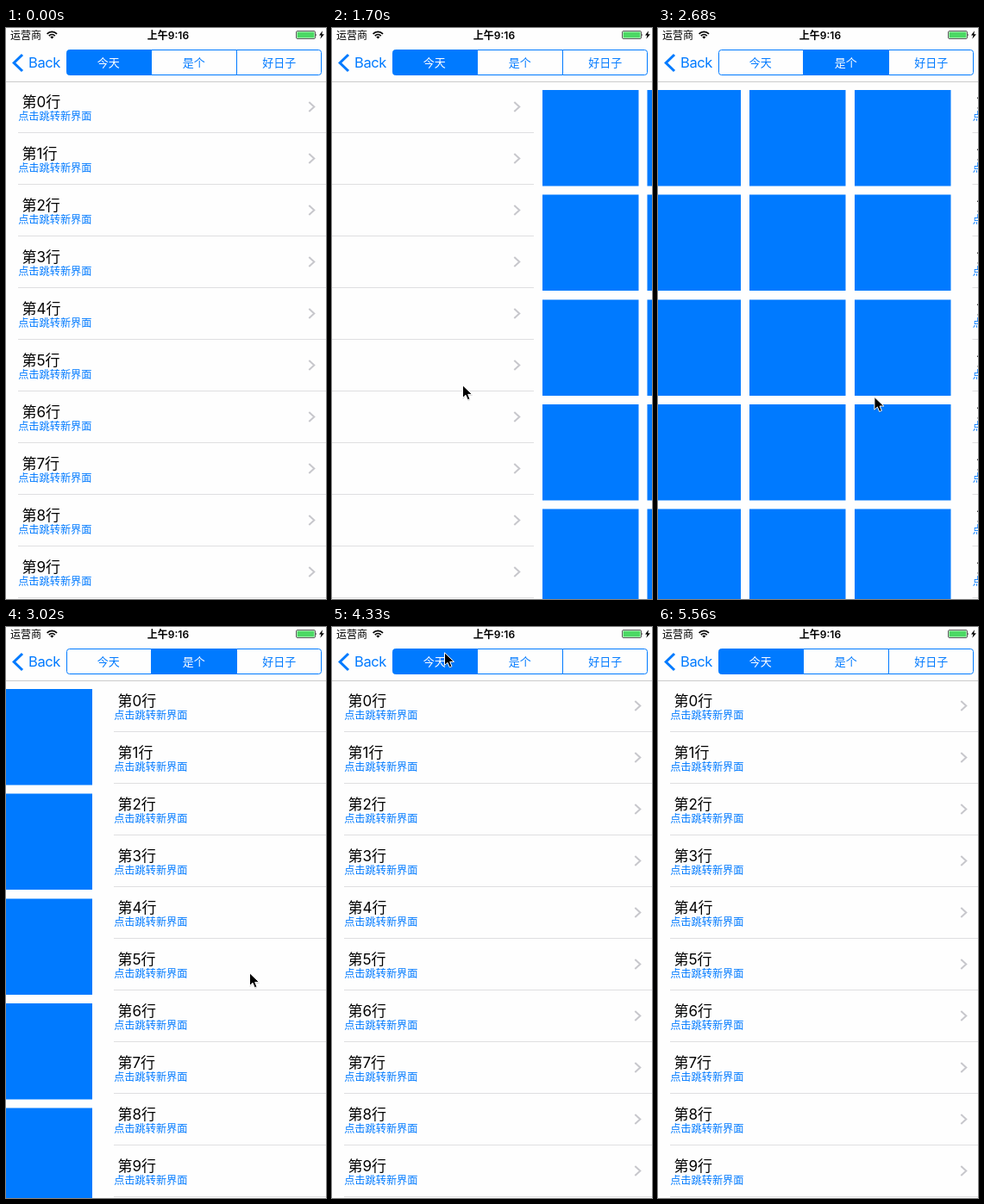
These frames come from a looping animation (371x663 px, 5890 ms). An HTML page:

```html
<!DOCTYPE html>
<html lang="zh-CN">
<head>
<meta charset="utf-8">
<title>Paged lists</title>
<style>
  html, body { margin: 0; width: 100%; height: 100%; overflow: hidden; background: #fefefe; }
  svg { display: block; width: 371px; height: 663px; }
  text { font-family: Inter, "Noto Sans CJK SC", "Noto Sans CJK", sans-serif; }
  .title { font-size: 17px; }
  .sub { font-size: 12.2px; fill: #007aff; }
  .seg { font-size: 13px; text-anchor: middle; }
  .status { font-size: 12px; }
</style>
</head>
<body>
<svg viewBox="0 0 371 663">
  <rect width="371" height="663" fill="#fefefe"/>
  <g id="pages"></g>

  <rect width="371" height="62" fill="#fefefe"/>
  <rect y="62" width="371" height="1" fill="#cbcbcb"/>

  <text class="status" x="5" y="12.5">运营商</text>
  <g fill="none" stroke="#000" stroke-width="1.7">
    <path d="M47.6 6.8a8 8 0 0 1 11.4 0M49.8 9.1a5 5 0 0 1 7 0"/>
    <path d="M51.3 10.4a2.9 2.9 0 0 1 4 0L53.3 12.6z" fill="#000" stroke="none"/>
  </g>
  <text class="status" x="188" y="12.5" text-anchor="middle" font-weight="600">上午9:16</text>
  <rect x="336.5" y="3.5" width="22" height="9" rx="1.5" fill="none" stroke="#333" stroke-width=".8"/>
  <rect x="337.5" y="4.5" width="20" height="7" rx=".6" fill="#4cd964"/>
  <path d="M359.3 6.4q1.6 1.6 0 3.2z" fill="#222"/>
  <path d="M367 3.2l-4 5.3h2.5l-1.2 4.3 4.6-5.6h-2.6z"/>

  <path d="M19 31L9.2 40.5 19 50" fill="none" stroke="#007aff" stroke-width="3"/>
  <text x="26" y="46" font-size="16.5" letter-spacing="-.4" fill="#007aff">Back</text>
  <g id="tabs"></g>

  <g id="cursor">
    <path d="M.6 1.6V17l3.7-3.4 2.4 5.4 2.6-1.1-2.3-5.2h5z" fill="#000" opacity=".18"/>
    <path d="M.5 .8V15.6l3.5-3.3 2.3 5.5 2.7-1.1-2.3-5.3h4.8z" fill="#000" stroke="#fff" stroke-width="1"/>
  </g>
</svg>
<script>
const LOOP = 5890, PAGE = 375, BLUE = '#007aff';
const $ = id => document.getElementById(id);
const range = n => [...Array(n).keys()];
const half = v => Math.round(v * 2) / 2;

// Screen updates: first time, last time, number of updates
const bursts = [
  [600, 800, 8], [1280, 1700, 7], [1760, 1820, 2], [1880, 2060, 3],
  [2490, 2770, 5], [2910, 3020, 3], [3110, 3290, 4], [3650, 3650, 1],
  [3710, 4030, 13], [4330, 4590, 5], [4680, 4680, 1], [4830, 5080, 9], [5380, 5560, 7]
];
const ticks = [0, ...bursts.flatMap(([a, b, n]) =>
  range(n).map(i => n > 1 ? Math.round(a + (b - a) * i / (n - 1)) : a))];
const snap = t => ticks.filter(k => k <= t).pop();

const easeIn = u => u * u;
const easeOut = u => 1 - (1 - u) ** 2;
const easeInOut = u => u < .5 ? 4 * u ** 3 : 1 - 4 * (1 - u) ** 3;

// Pointer moves: begin, end, x, y, easing
const moves = [
  [600, 800, 301, 440, easeOut],
  [1220, 1700, 151, 414, easeIn],
  [1700, 2060, 285, 437, easeInOut],
  [2430, 2770, 185, 410, easeIn],
  [2850, 3020, 282, 401, easeInOut],
  [3590, 4030, 130, 29, easeInOut],
  [4800, 5080, 336, 603, easeInOut],
  [5360, 5560, 337, 664, easeIn]
];

function pointer(t) {
  let x = 354, y = 636;
  for (const [begin, end, toX, toY, ease] of moves) {
    if (t < begin) break;
    const k = ease(Math.min(1, (t - begin) / (end - begin)));
    x += (toX - x) * k;
    y += (toY - y) * k;
  }
  return [x, y];
}

// Distance left while a released page settles
const settle = (t, end) => 235 * Math.max(0, (end - t) / 360) ** 2.6;

function scroll(t, x) {
  if (t < 1280) return 0;
  if (t < 1700) return Math.max(0, 291 - x);
  if (t < 2490) return PAGE - settle(t, 2060);
  if (t < 2910) return PAGE + Math.max(0, 275 - x);
  if (t < 4330) return 2 * PAGE - settle(t, 3290);
  return 2 * PAGE * (1 - easeInOut(Math.min(1, (t - 4330) / 309)));
}

const selected = t => t < 2060 || t >= 4330 ? 0 : t < 3290 ? 1 : 2;

const list = range(10).map(i => `<g transform="translate(0 ${60 * i})">
  <text class="title" x="18.5" y="91.5">第${i}行</text>
  <text class="sub" x="14.2" y="107.3">点击跳转新界面</text>
  <path d="M351.3 86l6 5.5-6 5.5" fill="none" stroke="#c7c7cc" stroke-width="2"/>
  <rect x="14" y="121" width="360" height="1" fill="#dfdfe1"/></g>`).join('');

const pitch = 365 / 3;
const grid = range(15).map(i => `<rect x="${half(9 + pitch * (i % 3))}"
  y="${half(72 + pitch * Math.floor(i / 3))}" width="111.5" height="111.5" fill="${BLUE}"/>`).join('');

$('pages').innerHTML = [list, grid, list]
  .map((page, i) => `<g transform="translate(${PAGE * i} 0)">${page}</g>`).join('');

const tabShapes = [
  'M168.5 25.5H73.5a3 3 0 0 0-3 3V51.5a3 3 0 0 0 3 3H168.5z',
  'M168.5 25.5H267.5V54.5H168.5z',
  'M267.5 25.5H362.5a3 3 0 0 1 3 3V51.5a3 3 0 0 1-3 3H267.5z'
];
$('tabs').innerHTML = ['今天', '是个', '好日子'].map((label, i) =>
  `<g><path d="${tabShapes[i]}" stroke="${BLUE}"/>
  <text class="seg" x="${[118.7, 217.7, 316.7][i]}" y="45">${label}</text></g>`).join('');

function draw(time) {
  const t = snap(time), [x, y] = pointer(t);
  $('pages').setAttribute('transform', `translate(${-half(scroll(t, x))} 0)`);
  [...$('tabs').children].forEach((tab, i) => {
    const on = i === selected(t);
    tab.children[0].setAttribute('fill', on ? BLUE : '#fefefe');
    tab.children[1].setAttribute('fill', on ? '#fff' : BLUE);
  });
  $('cursor').setAttribute('transform', `translate(${x} ${y})`);
  $('cursor').setAttribute('visibility', t < 600 || t >= 5560 ? 'hidden' : 'visible');
}

let start;
function loop(now) {
  start ??= now;
  draw((now - start) % LOOP);
  requestAnimationFrame(loop);
}
draw(0);
requestAnimationFrame(loop);
</script>
</body>
</html>
```
